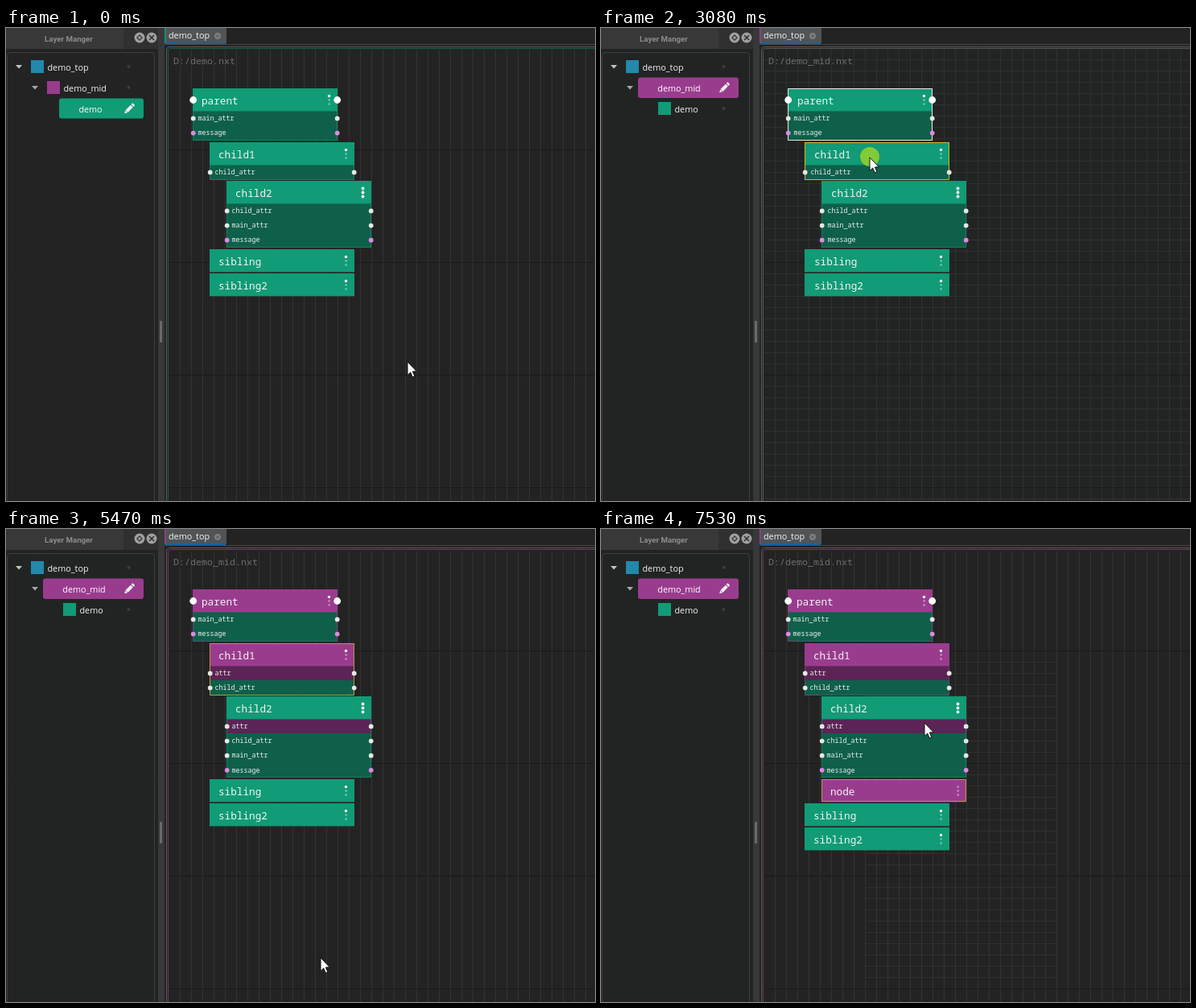
An HTML page with a canvas for the animation above (8000 ms loop, 732 by 588 pixels).

```html
<!DOCTYPE html>
<html lang="en">
<head>
<meta charset="utf-8">
<title>Layer editing</title>
<style>
html, body { margin: 0; width: 100%; height: 100%; overflow: hidden; background: #232323; }
canvas { display: block; }
</style>
</head>
<body>
<canvas id="stage" width="732" height="588"></canvas>
<script>
const ctx = document.getElementById('stage').getContext('2d');
const LOOP = 8000, TICK = 171.1;
const GREEN = '#119b76', DARK_GREEN = '#0e604a', MAGENTA = '#9a3c8e', DARK_MAGENTA = '#5c2456';
const BLUE = '#1464a0', BG = '#232323', TINTED = '#222423';
const UI = '10.8px "Open Sans", sans-serif';
const mono = size => `${size}px "Noto Sans Mono", monospace`;

// Ticks at which the state changes
const SWITCH = 6, LEAVE = 7, SELECT = 17, MENU1 = 19, ATTR = 27, MENU2 = 37, ADDED = 44;
const CLICKS = [17, 18, 26, 36, 43];
const cursorKeys = [
  [0, 499, 415], [5, 105, 80], [6, 104, 80], [7, 225, 112], [13, 334, 161], [20, 334, 161],
  [25, 390, 548], [29, 390, 548], [32, 391, 533], [36, 331, 159], [39, 331, 159], [43, 402, 241], [47, 402, 241]
];

// label | shortcut | icon; an empty entry is a separator
const menuItems = [
  'Execute Selected|Enter', 'Execute From Selected', 'Execute Hierarchy', '',
  'Add Node|N|plus', 'Revert child order', '', 'Enable/Disable Node|D', '',
  'Rename Node', 'Duplicate Node|Ctrl+D|arrow', '',
  'Cut|Ctrl+X|dash', 'Copy|Ctrl+C|copy', 'Paste|Ctrl+V|paste', 'Delete Node|Del|cross', '',
  'Localize Node||arrow', 'Revert Node||cross', '',
  'Instance Node|Ctrl+I|link', 'Remove Instance|Ctrl+Shift+I|cross', '', 'Add Attribute|Shift+A'
].map(s => s.split('|'));

function rect(x, y, w, h, color) {
  ctx.fillStyle = color;
  ctx.fillRect(x, y, w, h);
}
function frame(x, y, w, h, color, radius = 0) {
  ctx.strokeStyle = color;
  ctx.lineWidth = 1;
  ctx.beginPath();
  ctx.roundRect(x + .5, y + .5, w, h, radius);
  ctx.stroke();
}
function box(x, y, w, h, color, radius) {
  ctx.fillStyle = color;
  ctx.beginPath();
  ctx.roundRect(x, y, w, h, radius);
  ctx.fill();
}
function dot(x, y, r, color) {
  ctx.fillStyle = color;
  ctx.beginPath();
  ctx.arc(x, y, r, 0, 7);
  ctx.fill();
}
function poly(points, color) {
  ctx.fillStyle = color;
  ctx.beginPath();
  points.forEach(p => ctx.lineTo(...p));
  ctx.closePath();
  ctx.fill();
}
function line(points, color, width = 1) {
  ctx.strokeStyle = color;
  ctx.lineWidth = width;
  ctx.beginPath();
  points.forEach(p => ctx.lineTo(...p));
  ctx.stroke();
}
function text(s, x, y, color, font = UI, align = 'left') {
  ctx.font = font;
  ctx.textAlign = align;
  ctx.fillStyle = color;
  ctx.fillText(s, x, y);
}

function cursorAt(tick) {
  const i = cursorKeys.findIndex(k => k[0] > tick);
  const [t0, x0, y0] = cursorKeys[i - 1], [t1, x1, y1] = cursorKeys[i];
  const u = (tick - t0) / (t1 - t0);
  return { x: x0 + (x1 - x0) * u, y: y0 + (y1 - y0) * u };
}

function nodesAt(tick) {
  const hasAttr = tick >= ATTR, extra = hasAttr ? ['attr'] : [];
  const nodes = [
    { name: 'parent', depth: 0, attrs: ['main_attr', 'message'], local: hasAttr, filled: 1 },
    { name: 'child1', depth: 1, attrs: [...extra, 'child_attr'], local: hasAttr, filled: 1 },
    { name: 'child2', depth: 2, attrs: [...extra, 'child_attr', 'main_attr', 'message'], filled: 3 },
    { name: 'sibling', depth: 1, attrs: [], filled: 1 },
    { name: 'sibling2', depth: 1, attrs: [], filled: 1 }
  ];
  if (tick >= ADDED) nodes.splice(3, 0, { name: 'node', depth: 2, attrs: [], local: true, filled: 0 });
  let y = 75;
  for (const n of nodes) {
    n.x = 232 + 21 * n.depth;
    n.y = Math.round(y);
    n.h = Math.round(28.4 + 18.15 * n.attrs.length);
    y += 30.2 + 18.15 * n.attrs.length;
  }
  const selected = tick >= ADDED ? 'node' : tick >= SELECT ? 'child1' : '';
  nodes.forEach(n => n.selected = n.name === selected);
  return nodes;
}

// Hovering a node also hovers its ancestors.
function markHover(nodes, p) {
  let i = nodes.findIndex(n => p.x >= n.x && p.x < n.x + 180 && p.y >= n.y && p.y < n.y + n.h);
  if (i < 0) return false;
  for (let depth = nodes[i].depth + 1; i >= 0; i--) {
    if (nodes[i].depth < depth) {
      nodes[i].hover = true;
      depth = nodes[i].depth;
    }
  }
  return true;
}

function drawGrid(tick) {
  const full = tick >= SWITCH && tick < ATTR;
  rect(197, 20, 535, 568, full ? TINTED : BG);
  const color = full ? '#2f3130' : '#333333';
  for (let x = 216; x < 732; x += 14) rect(x, 27, 1, 561, color);
  if (full) for (let y = 39; y < 588; y += 14) rect(203, y, 529, 1, color);
  if (tick >= ADDED) for (let y = 165; y < 565; y += 14) rect(328, y, 240, 1, '#2f3130');
  for (let y = 151; y < 588; y += 140) rect(203, y, 529, 1, '#191919');
  frame(199, 23, 600, 600, '#5c5c5c', 4);
  frame(201, 25, 600, 600, tick < SWITCH ? '#14604e' : full ? '#555857' : '#6b3a66', 3);
  const bright = tick < SWITCH ? 0 : Math.max(0, Math.min(1, (14 - tick) / 7));
  const grey = 110 + 115 * bright;
  text(tick < SWITCH ? 'D:/demo.nxt' : 'D:/demo_mid.nxt', 208, 45, `rgb(${grey},${grey},${grey})`, mono(11.67));
}

function drawNode(n, nudge, tick) {
  const { x, y, h } = n, head = n.local ? MAGENTA : GREEN;
  rect(x, y, 180, h, DARK_GREEN);
  n.attrs.forEach((a, i) => {
    if (a === 'attr') rect(x, y + 28 + 18 * i, 180, 18, DARK_MAGENTA);
  });
  ctx.globalAlpha = .6;
  frame(x, y, 179, h - 1, head);
  ctx.globalAlpha = 1;
  rect(x, y, 180, 28.4, head);
  if (n.selected) frame(x, y, 179, h - 1, tick < ATTR ? '#c8bc28' : '#b99a3a');
  else if (n.hover) frame(x, y, 179, h - 1, '#e8e8e8');
  text(n.name, x + 11 + nudge, y + 19.5 + nudge / 2, '#f4f4f4', mono(12.7));
  for (let i = 0; i < 3; i++) {
    const dy = y + 9.5 + 5 * i;
    if (i < n.filled) dot(x + 169.5, dy, n.filled > 1 ? 1.9 : 1.7, '#fff');
    else frame(x + 168.2, dy - 1.4, 1.8, 1.8, 'rgba(255,255,255,.5)', 1);
  }
  if (!n.depth) [.7, 179.7].forEach(dx => dot(x + dx, y + 14.5, 4.4, '#fff'));
  n.attrs.forEach((a, i) => {
    const cy = y + 37.4 + 18.15 * i;
    text(a, x + 6.5 + nudge, cy + 2.7, '#f0f0f0', mono(8.33));
    [.7, 179.7].forEach(dx => dot(x + dx, cy, 2.9, a === 'message' ? '#dd8add' : '#e6e6e6'));
  });
}

function drawIcon(kind, x, y) {
  const c = '#a4a4a4';
  if (kind === 'dash') {
    ctx.setLineDash([2, 1]);
    frame(x - 6, y - 4, 11, 6, c);
    ctx.setLineDash([]);
    frame(x - 3, y - 1, 8, 5, c);
  } else if (kind === 'copy' || kind === 'paste') {
    frame(x - 6, y - 4, 9, 6, c);
    rect(x - 3, y - 1, 10, 6, BG);
    frame(x - 3, y - 1, 9, 5, c);
    if (kind === 'paste') {
      rect(x - 1, y + 1, 6, 1, c);
      rect(x + 1, y, 1, 4, c);
    }
  } else {
    rect(x - 7, y, 9, 5, c);
    if (kind === 'plus') {
      rect(x + 2, y - 3, 7, 2, c);
      rect(x + 4.5, y - 5.5, 2, 7, c);
    } else if (kind === 'cross') {
      line([[x + 2, y - 6], [x + 7, y - 1]], c, 1.5);
      line([[x + 7, y - 6], [x + 2, y - 1]], c, 1.5);
    } else if (kind === 'link') {
      frame(x - 1, y - 6, 4, 3, c, 1.5);
      frame(x + 3, y - 6, 4, 3, c, 1.5);
      rect(x + 4, y + 1, 2, 4, c);
    } else {
      line([[x - 3, y - 3], [x, y - 5], [x + 4, y - 5], [x + 6, y - 1]], c, 1.5);
      poly([[x + 3, y - 2], [x + 8, y - 2], [x + 6, y + 1]], c);
      line([[x + 3, y + 5], [x + 6, y + 5], [x + 6, y + 2]], c);
    }
  }
}

function drawMenu(x, y, border, p) {
  rect(x, y, 233, 405, BG);
  let top = y + 2.5;
  for (const [label, keys, icon] of menuItems) {
    const h = !label ? 2 : icon ? 24 : 21, mid = top + h / 2;
    if (!label) rect(x + 4, Math.round(top), 225, 1.5, '#545454');
    else {
      if (p.x > x + 4 && p.y >= top && p.y < top + h) rect(x + 2, top, 230, h, BLUE);
      text(label, x + 46, mid + 4, '#f2f2f2');
      if (keys) text(keys, x + 145, mid + 4, '#f2f2f2');
      if (icon) drawIcon(icon, x + 12, Math.round(mid) - 1);
    }
    top += h;
  }
  frame(x, y, 232, 404, border);
}

function drawPencil(x, y) {
  ctx.save();
  ctx.translate(x, y);
  ctx.rotate(-Math.PI / 4);
  rect(-5, -2, 9, 4, '#f0f0f0');
  rect(5, -2, 2.5, 4, '#f0f0f0');
  poly([[-5.5, -2], [-9, 0], [-5.5, 2]], '#f0f0f0');
  ctx.restore();
}

function chevron(x, y, color) {
  poly([[x - 4, y - 2], [x + 4, y - 2], [x, y + 2.5]], color);
}

function drawPanel(tick) {
  const focused = tick === SWITCH, mid = tick >= SWITCH;
  rect(0, 0, 197, 588, mid ? TINTED : BG);
  rect(0, 0, 146, 26, '#383838');
  rect(146, 0, 43, 26, '#303030');
  text('Layer Manger', 78, 17, '#8c8c8c', 'bold 9.7px Roboto, sans-serif', 'center');
  dot(166, 12, 6.5, '#a0a0a0');
  poly([[166, 8], [170, 12], [166, 16], [162, 12]], '#383838');
  dot(166, 12, 1.8, '#a0a0a0');
  dot(181, 12, 6.5, '#a0a0a0');
  line([[178, 9], [184, 15]], '#303030', 1.6);
  line([[184, 9], [178, 15]], '#303030', 1.6);
  frame(1, 30, 183, 600, focused ? '#1c7cc0' : '#3e3e3e', 4);
  rect(189, 0, 8, 588, '#383838');
  box(191, 364, 3, 27, '#6a6a6a', 1);

  chevron(16, 48, '#c4c4c4');
  rect(31, 40, 16, 16, '#2388ab');
  text('demo_top', 51.5, 52.5, '#f2f2f2');
  dot(152.5, 48, 2, '#3c3e3d');
  chevron(36, 74, focused ? '#fff' : '#a8a8a8');
  if (mid) {
    box(46, 61.5, 125, 25.5, MAGENTA, 3);
    text('demo_mid', 97, 78.5, '#fff', UI, 'center');
    rect(71, 92, 16, 16, GREEN);
    text('demo', 91.5, 104.5, '#f2f2f2');
  } else {
    rect(51, 66, 16, 16, MAGENTA);
    text('demo_mid', 71.5, 78.5, '#f2f2f2');
    box(66, 87.5, 105, 25, GREEN, 3);
    text('demo', 105, 104.5, '#fff', UI, 'center');
  }
  dot(152.5, mid ? 100 : 74, 2, '#3c3e3d');
  drawPencil(153.5, mid ? 74 : 100);
}

function drawTabs(tick) {
  rect(197, 0, 535, 20, BG);
  rect(197, 20, 535, 1, '#454545');
  box(197, -4, 77, 24, '#505456', 3);
  if (tick !== SWITCH) rect(198, 18, 75, 2, BLUE);
  rect(197, 0, 1.5, 19, tick < SWITCH ? GREEN : MAGENTA);
  text('demo_top', 202, 13, '#f4f4f4');
  dot(263, 10, 4, '#7c7f81');
  line([[261.5, 8.5], [264.5, 11.5]], '#505456');
  line([[264.5, 8.5], [261.5, 11.5]], '#505456');
}

function drawCursor(p, clicked) {
  if (clicked) dot(p.x, p.y - 1, 12, 'rgba(150,210,45,.85)');
  ctx.save();
  ctx.translate(p.x, p.y);
  poly([[0, 0], [0, 16.5], [3.7, 13], [6.2, 18.8], [8.8, 17.6], [6.4, 12], [11.3, 11.8]], '#fff');
  ctx.strokeStyle = '#111';
  ctx.lineWidth = 1;
  ctx.stroke();
  ctx.restore();
}

function draw(now) {
  const tick = Math.floor((now % LOOP) / TICK + .12);
  const p = cursorAt(tick), nodes = nodesAt(tick);
  const firstMenu = tick >= MENU1 && tick < ATTR, secondMenu = tick >= MENU2 && tick < ADDED;
  const menuOpen = firstMenu || secondMenu;
  const hovering = !menuOpen && tick > 0 && tick < ADDED && markHover(nodes, p);
  drawGrid(tick);
  drawTabs(tick);
  drawPanel(tick);
  nodes.forEach(n => drawNode(n, menuOpen || hovering ? 1 : 0, tick));
  if (firstMenu) drawMenu(332, 158, MAGENTA, p);
  if (secondMenu) drawMenu(329, 157, '#747474', p);
  drawCursor(p, CLICKS.includes(tick));
}

const start = performance.now();
function loop() {
  draw(performance.now() - start);
  requestAnimationFrame(loop);
}
loop();
</script>
</body>
</html>
```
